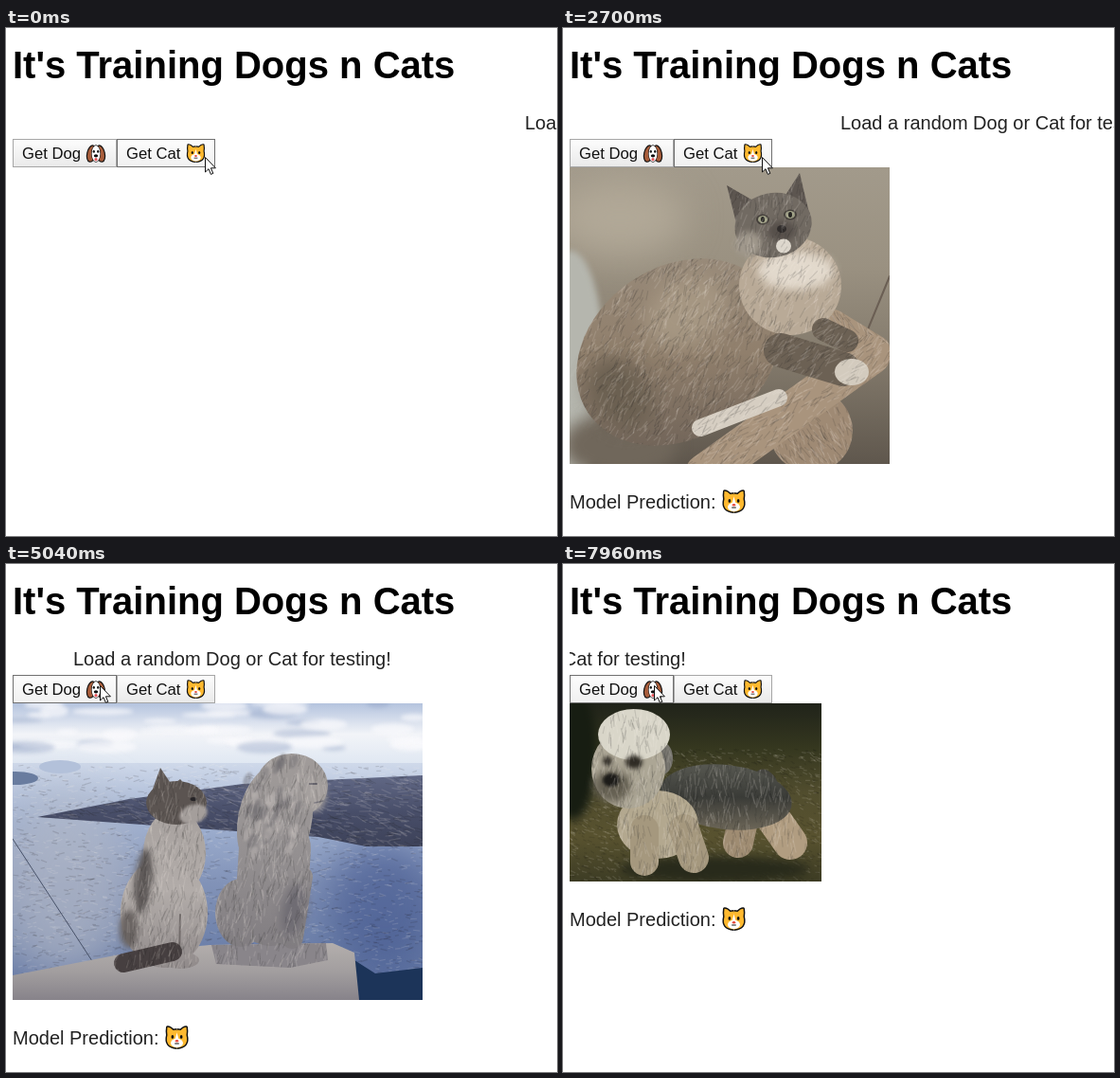
An HTML page with a canvas that plays this animation: 582x536 px, repeating every 7.99 s.

```html
<!DOCTYPE html>
<html lang="en">
<head>
<meta charset="utf-8">
<title>Training Dogs n Cats</title>
<style>
html, body { margin: 0; width: 100%; height: 100%; overflow: hidden; background: #fff; }
canvas { display: block; }
</style>
</head>
<body>
<canvas id="stage" width="582" height="536"></canvas>
<script>
const W = 582, H = 536, LOOP = 7990;
const LEFT = 7, TOP = 147;
const SANS = '"Liberation Sans", Arial, sans-serif';
const ctx = document.getElementById('stage').getContext('2d');

function seeded(seed) {
  return () => (seed = (seed * 16807) % 2147483647) / 2147483647;
}

function sheet() {
  const c = document.createElement('canvas');
  c.width = W;
  c.height = H;
  return c.getContext('2d');
}

function oval(g, color, x, y, rx, ry, turn = 0, blur = 0) {
  g.filter = blur ? `blur(${blur}px)` : 'none';
  g.fillStyle = color;
  g.beginPath();
  g.ellipse(x, y, rx, ry, turn, 0, Math.PI * 2);
  g.fill();
  g.filter = 'none';
}

function poly(g, color, ...xy) {
  g.fillStyle = color;
  g.beginPath();
  for (let i = 0; i < xy.length; i += 2) g.lineTo(xy[i], xy[i + 1]);
  g.closePath();
  g.fill();
}

function limb(g, color, width, x0, y0, x1, y1) {
  g.strokeStyle = color;
  g.lineWidth = width;
  g.lineCap = 'round';
  g.beginPath();
  g.moveTo(x0, y0);
  g.lineTo(x1, y1);
  g.stroke();
}

// Vertical gradient
function fade(y0, y1, ...colors) {
  const f = ctx.createLinearGradient(0, y0, 0, y1);
  colors.forEach((c, i) => f.addColorStop(i / (colors.length - 1), c));
  return f;
}

// Short random strokes between two heights, light and dark
function grain(g, y0, y1, count, len, angle, alpha) {
  const rnd = seeded(count);
  g.lineWidth = 1.2;
  for (let i = 0; i < count; i++) {
    const x = LEFT + rnd() * 440, y = y0 + rnd() * (y1 - y0);
    const a = angle + (rnd() - 0.5) * 0.8, l = len * (0.5 + rnd());
    g.strokeStyle = `rgba(${i % 2 ? '255,250,240' : '20,18,16'},${alpha})`;
    g.beginPath();
    g.moveTo(x, y);
    g.lineTo(x + Math.cos(a) * l, y + Math.sin(a) * l);
    g.stroke();
  }
}

// A figure on its own layer, so that the fur stays inside its outline
function figure(g, angle, paint) {
  const layer = sheet();
  paint(layer);
  layer.globalCompositeOperation = 'source-atop';
  grain(layer, TOP, 460, 5000, 9, angle, 0.12);
  g.filter = 'blur(.7px)';
  g.drawImage(layer.canvas, 0, 0);
  g.filter = 'none';
}

function photo(w, h, paint) {
  const g = sheet();
  g.beginPath();
  g.rect(LEFT, TOP, w, h);
  g.clip();
  paint(g);
  return { canvas: g.canvas, base: TOP + h + 47 };
}

const fluffy = photo(338, 313, g => {
  g.fillStyle = fade(TOP, 460, '#a29a8b', '#9a9181', '#81786a', '#5f574d');
  g.fillRect(LEFT, TOP, 338, 313);
  oval(g, '#b1a897', 60, 200, 70, 40, 0, 18);
  limb(g, '#6b5f54', 2, 345, 262, 322, 318);
  oval(g, '#b5b6ae', 8, 360, 36, 125, 0, 3);
  oval(g, '#70675b', 60, 440, 60, 35, 0, 8);
  figure(g, 1, l => {
    oval(l, '#9f8a74', 262, 425, 44, 44);
    limb(l, '#a9947d', 26, 286, 310, 332, 338);
  });
  figure(g, 2.1, l => {
    oval(l, fade(245, 440, '#988a79', '#907f6c', '#73665a'), 122, 342, 115, 90, -0.6);
    oval(l, '#a59682', 130, 300, 45, 35, -0.6, 10);
    oval(l, '#6b6051', 60, 385, 30, 40, -0.6, 10);
    oval(l, '#b9aa97', 240, 272, 54, 52);
    oval(l, '#e2d9cc', 246, 256, 40, 20, 0, 5);
  });
  figure(g, 2.4, l => {
    limb(l, '#a9947d', 42, 325, 345, 150, 470);
    limb(l, '#d6cec2', 18, 145, 422, 228, 390);
    limb(l, '#6c6154', 24, 275, 318, 300, 330);
    limb(l, '#6c6154', 36, 230, 340, 296, 360);
    oval(l, '#d3cbbe', 305, 363, 18, 14);
  });
  figure(g, 1.8, l => {
    poly(l, '#5d5650', 173, 166, 206, 185, 183, 206);
    poly(l, '#5d5650', 250, 153, 260, 195, 230, 184);
    oval(l, '#716a62', 222, 208, 41, 34, -0.2);
    oval(l, '#a0988c', 196, 228, 14, 13, 0, 3);
    oval(l, '#57504b', 231, 214, 15, 11, 0, 3);
    for (const [x, y] of [[211, 202], [240, 197]]) {
      oval(l, '#45403b', x, y, 7, 5.5);
      oval(l, '#a5a68a', x, y, 5, 4);
      oval(l, '#242321', x, y, 2, 3);
    }
    oval(l, '#302c2b', 231, 212, 5, 4);
    oval(l, '#ddd7cd', 233, 230, 8, 7.5);
  });
});

const sea = photo(433, 313, g => {
  const rnd = seeded(83);
  g.fillStyle = fade(TOP, 212, '#b4c3de', '#f2f4f8', '#dfe7f2');
  g.fillRect(LEFT, TOP, 433, 66);
  for (let i = 0; i < 40; i++) {
    oval(g, i % 4 ? 'rgba(250,250,252,.7)' : 'rgba(143,160,196,.4)',
      LEFT + rnd() * 433, TOP + rnd() * 50, 10 + rnd() * 25, 2 + rnd() * 5, 0, 2);
  }
  g.fillStyle = fade(210, 460, '#cfd9ea', '#9fb0d0', '#8293b8', '#6f82ab', '#566b9c');
  g.fillRect(LEFT, 210, 433, 250);
  oval(g, 'rgba(178,184,198,.7)', 60, 340, 75, 100, 0, 25);
  oval(g, 'rgba(62,82,138,.6)', 400, 360, 60, 70, 0, 20);
  grain(g, 212, 440, 2600, 5, 0, 0.13);
  oval(g, '#b3c1da', 57, 214, 22, 7);
  oval(g, '#697c9f', 10, 226, 24, 7);
  figure(g, 0.2, l => poly(l, fade(225, 298, '#606784', '#484e69', '#3d4259'),
    33, 267, 130, 248, 250, 232, 440, 223, 440, 298, 380, 298, 330, 288, 130, 274));
  limb(g, '#485269', 1, 7, 290, 93, 422);
  poly(g, '#1c3459', 368, 418, 390, 432, 440, 426, 440, 460, 368, 460);
  poly(g, fade(400, 460, '#b3aeac', '#a29e9f', '#87838a'),
    7, 434, 120, 412, 215, 402, 345, 400, 368, 410, 373, 460, 7, 460);
  figure(g, 1.7, l => {
    const stone = fade(200, 410, '#a19c9a', '#949091', '#807c80');
    poly(l, '#89858a', 217, 402, 338, 400, 340, 418, 300, 426, 222, 422);
    oval(l, stone, 302, 234, 38, 34);
    oval(l, stone, 284, 270, 39, 62, 0.2);
    limb(l, stone, 76, 284, 300, 280, 365);
    oval(l, stone, 248, 368, 27, 36);
    limb(l, stone, 24, 312, 330, 302, 394);
    oval(l, '#a5a09e', 326, 243, 12, 18, 0, 3);
    oval(l, '#6f6c73', 304, 365, 12, 28, 0.2, 5);
    for (let i = 0; i < 45; i++) {
      oval(l, i % 2 ? 'rgba(185,180,177,.5)' : 'rgba(105,102,108,.4)',
        255 + rnd() * 55, 206 + rnd() * 100, 4, 8, 0.4, 1);
    }
    limb(l, '#67656d', 2, 321, 232, 328, 232);
    limb(l, '#75737b', 1.5, 326, 252, 335, 250);
  });
  figure(g, 1.7, l => {
    const coat = fade(265, 425, '#a8a29f', '#b2aca9', '#918b8b');
    oval(l, coat, 178, 305, 33, 46);
    oval(l, coat, 167, 368, 46, 58);
    oval(l, '#5e5958', 145, 335, 9, 35, 0.1, 3);
    oval(l, '#6a6462', 130, 385, 10, 20, 0, 3);
    limb(l, '#726c6b', 2, 184, 370, 183, 415);
    oval(l, coat, 184, 418, 20, 9);
    limb(l, '#463f40', 20, 124, 421, 176, 409);
    poly(l, '#5b5451', 149, 254, 163, 215, 177, 236);
    poly(l, '#5b5451', 172, 236, 184, 227, 200, 245);
    oval(l, '#5b5451', 180, 252, 32, 23);
    oval(l, '#a49e9b', 198, 264, 15, 10, -0.3, 1.5);
    oval(l, '#272528', 198, 248, 3.5, 2);
  });
});

const terrier = photo(266, 188, g => {
  g.fillStyle = fade(TOP, 335, '#20231a', '#35371f', '#514d2e', '#58522f', '#3d3c24');
  g.fillRect(LEFT, TOP, 266, 188);
  grain(g, 195, 335, 3000, 4, 0.4, 0.12);
  oval(g, '#171d12', 10, 200, 26, 70, 0, 5);
  oval(g, '#282a1b', 160, 322, 100, 13, 0, 5);
  figure(g, 1.6, l => {
    limb(l, '#9f8c72', 32, 192, 262, 185, 294);
    limb(l, '#b19d81', 36, 212, 254, 240, 294);
    oval(l, '#454540', 214, 234, 13, 18, -0.4);
    oval(l, fade(212, 280, '#565750', '#3a3b37', '#6b6557'), 172, 246, 70, 34, 0.12);
    oval(l, '#b3a88f', 100, 275, 43, 36);
    limb(l, '#a5987e', 30, 86, 280, 86, 314);
    limb(l, '#a5987e', 32, 128, 280, 138, 310);
    oval(l, '#78766f', 105, 205, 11, 17);
    oval(l, '#aca695', 69, 216, 39, 42);
    oval(l, '#d9d6c9', 75, 180, 38, 27);
    oval(l, '#656052', 52, 234, 20, 17, 0, 4);
    oval(l, '#302c25', 75, 209, 9, 7, 0, 2);
    oval(l, '#302c25', 47, 208, 5, 5, 0, 2);
    oval(l, '#1c1b18', 51, 228, 9, 7, 0, 1.5);
  });
});

// What is on the page, from the given time on
const scenes = [
  { from: 0 },
  { from: 1250, image: fluffy },
  { from: 2900 },
  { from: 3600, image: sea },
  { from: 6160 },
  { from: 6640, image: terrier },
];

// Draws in a box of 20 units; the shape is called for each side, -1 and 1
function emoji(x, y, size, shape, features) {
  ctx.save();
  ctx.translate(x + size / 2, y + size / 2);
  ctx.scale(size / 20, size / 20);
  ctx.lineJoin = 'round';
  ctx.lineWidth = 2.4;
  ctx.strokeStyle = '#111';
  for (const side of [-1, 1]) { shape(side); ctx.stroke(); }
  for (const side of [-1, 1]) shape(side);
  features();
  ctx.restore();
}

function eyes(gap, y) {
  for (const side of [-1, 1]) oval(ctx, '#111', side * gap, y, 1.1, 1.5);
}

function catSide(side) {
  ctx.beginPath();
  ctx.fillStyle = '#ffb92f';
  ctx.moveTo(0, -6.5);
  ctx.lineTo(side * 3.2, -6);
  ctx.quadraticCurveTo(side * 6, -9, side * 8, -8.6);
  ctx.quadraticCurveTo(side * 8.6, -5, side * 8, -2);
  ctx.quadraticCurveTo(side * 10.5, 8, 0, 8.8);
  ctx.fill();
}

function catFace() {
  oval(ctx, '#fff', 0, 4.8, 5.2, 3.8);
  poly(ctx, '#fff', -2, 3, 0, -4, 2, 3);
  eyes(3.7, -0.5);
  oval(ctx, '#e5483d', 0, 3, 1.4, 1);
  limb(ctx, '#111', 0.8, -1.5, 5.2, 1.5, 5.2);
}

function dogSide(side) {
  oval(ctx, '#a85d3b', side * 4.7, 0.6, 4, 8.2, side * -0.22);
}

function dogFace() {
  oval(ctx, '#111', 0, 0.5, 5, 9.2);
  oval(ctx, '#fff', 0, 0.5, 4.4, 8.6);
  eyes(2.2, -1.8);
  oval(ctx, '#e8545a', 0, 6.6, 1.6, 1.7);
  oval(ctx, '#111', 0, 2.8, 2.2, 1.6);
}

function text(str, x, y, font, color = '#222') {
  ctx.font = `${font} ${SANS}`;
  ctx.fillStyle = color;
  ctx.fillText(str, x, y);
}

function button(x, w, label, hover) {
  ctx.fillStyle = fade(117, 147, '#fdfdfd', hover ? '#f0f0f0' : '#e9e9e9');
  ctx.fillRect(x, 117, w, 30);
  ctx.strokeStyle = hover ? '#707070' : '#a6a6a6';
  ctx.lineWidth = 1;
  ctx.strokeRect(x + 0.5, 117.5, w - 1, 29);
  text(label, x + 10, 138, '16.67px', '#111');
}

function progress(t, from, to) {
  const k = Math.min(1, Math.max(0, (t - from) / (to - from)));
  return k * k * (3 - 2 * k);
}

const arrow = new Path2D('M.5 .5V16L4 12.7L6.4 18.4L8.8 17.4L6.4 11.8H11.4Z');

function cursor(x, y) {
  ctx.save();
  ctx.translate(x, y);
  ctx.fillStyle = '#fff';
  ctx.fill(arrow);
  ctx.strokeStyle = '#111';
  ctx.lineWidth = 1;
  ctx.stroke(arrow);
  ctx.restore();
}

function marquee(t) {
  ctx.save();
  ctx.beginPath();
  ctx.rect(LEFT, 85, W - LEFT, 30);
  ctx.clip();
  text('Load a random Dog or Cat for testing!', Math.round(548.3 - 0.0947 * t), 107, '20px');
  ctx.restore();
}

function draw(t) {
  ctx.fillStyle = '#fff';
  ctx.fillRect(0, 0, W, H);
  text("It's Training Dogs n Cats", LEFT, 53, 'bold 40px', '#000');
  marquee(t);

  const x = Math.round(210 - 114 * progress(t, 4450, 5100));
  const y = Math.round(136 - 8 * progress(t, 4450, 4820));
  button(LEFT, 110, 'Get Dog', x < 117);
  emoji(85, 122, 20, dogSide, dogFace);
  button(117, 104, 'Get Cat', x >= 117);
  emoji(190.5, 122, 20, catSide, catFace);

  const { image } = scenes.filter(s => s.from <= t).pop();
  if (image) {
    ctx.drawImage(image.canvas, 0, 0);
    text('Model Prediction:', LEFT, image.base, '20px');
    emoji(168, image.base - 20, 25, catSide, catFace);
  }
  cursor(x, y);
}

const start = performance.now();
function tick() {
  draw((performance.now() - start) % LOOP);
  requestAnimationFrame(tick);
}
tick();
</script>
</body>
</html>
```
